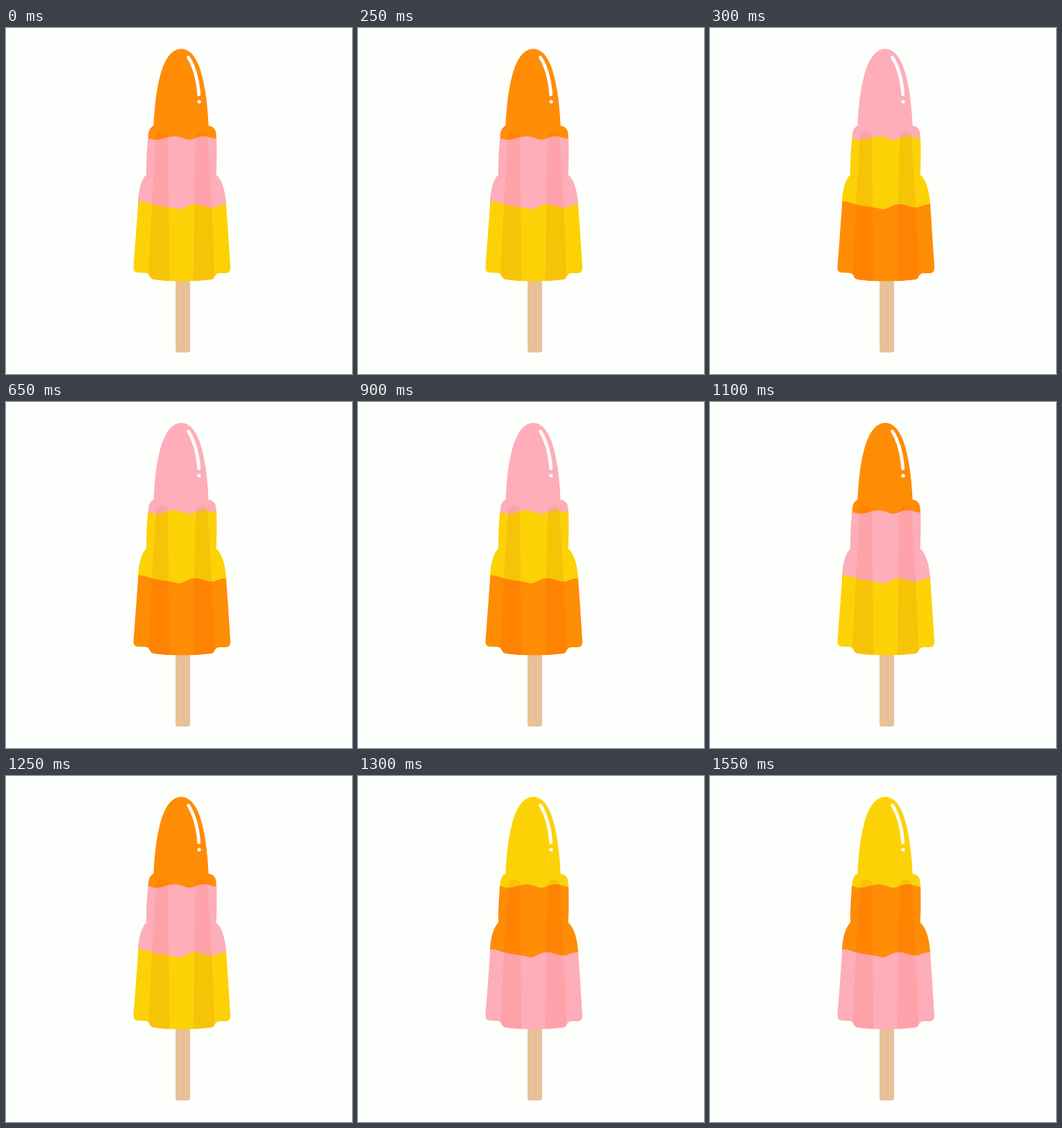
An HTML page for the animation above (1600 ms loop, 498 by 498 pixels).

```html
<!DOCTYPE html>
<html lang="en">
<head>
<meta charset="utf-8">
<title>Ice lolly</title>
<style>
  html, body { margin: 0; width: 100%; height: 100%; overflow: hidden; background: #fdfffc; }
  svg { display: block; width: 100vw; height: 100vh; }
  .tier { fill: var(--ice); }
  .flute { fill: var(--shade); }
</style>
</head>
<body>
<svg viewBox="0 0 498 498">
  <defs>
    <path id="top" d="M252 30C267 30 277 47 282.500 70C288 93 290.500 116 291.500 140.500
      C299 142 302 146 302.500 153L303 165H204.300L204.700 156C205 148 207.500 143 212.500 140.500
      C213.500 116 216 91 221.500 70C227.500 46 238 30 252 30Z"/>
    <path id="mid" d="M204.300 158C212 161.500 220 162 228 159C238 155 247 155 256 159
      C262 161.500 267 161 273 158.500C281 155 288 155 295 158L303 159.500
      C303.500 175 303.500 195 302.500 211C311 218 315.500 234 317 253V262H190V250
      C191 234 194 219 202 211C201.500 192 203 175 204.300 158Z"/>
    <path id="low" d="M190.500 249.500C200 249.500 205 252 210 254C222 257 238 258 248 261
      C256 261 262 254 271 253.500C281 254 287 258.500 296 258.500C304 258 309 252.500 317 254
      L323 344Q323.500 353 316 353L306 353Q302 354 300 358Q299 361 295 362Q274 364.500 252 364.500
      Q230 364.500 213 362Q208 361 207 357Q205 352.500 200 352.500L190 352Q183 352 183.500 344Z"/>
    <path id="flutes" d="M216 156Q217 149 224.500 149T233 156L235.500 370H204.500L210 254Z
      M273 156Q274 149 281.500 149T290 156L296 254L301 370H269.500L271 254Z"/>
    <clipPath id="topClip"><use href="#top"/></clipPath>
    <clipPath id="midClip"><use href="#mid"/></clipPath>
    <clipPath id="lowClip"><use href="#low"/></clipPath>
  </defs>

  <path d="M244 360H265V464Q265 467 262 467H247Q244 467 244 464Z" fill="#e8c197"/>

  <g class="tier">
    <use href="#top"/>
    <use href="#flutes" class="flute" clip-path="url(#topClip)"/>
  </g>
  <g class="tier">
    <use href="#mid"/>
    <use href="#flutes" class="flute" clip-path="url(#midClip)"/>
  </g>
  <g class="tier">
    <use href="#low"/>
    <use href="#flutes" class="flute" clip-path="url(#lowClip)"/>
  </g>

  <path d="M262.500 42.300Q275 62 277.700 95.700" fill="none" stroke="#fff" stroke-width="4.800" stroke-linecap="round"/>
  <circle cx="278" cy="106" r="2.600" fill="#fff"/>
</svg>

<script>
  const flavours = [
    { ice: '#ff8c05', shade: '#ff8303' },
    { ice: '#fdaeb8', shade: '#fea2aa' },
    { ice: '#fcd206', shade: '#f6c307' }
  ];
  const tiers = document.querySelectorAll('.tier');
  const TICK = 50, TICKS = 32;
  const SHIFTS = 39, PHASE = 0.375;

  // Flavours climb 39 times per loop, seen only on the 50 ms ticks.
  function draw() {
    const tick = Math.floor(performance.now() / TICK) % TICKS;
    const shift = Math.floor(tick * SHIFTS / TICKS + PHASE);
    tiers.forEach((tier, i) => {
      const { ice, shade } = flavours[(i + shift) % flavours.length];
      tier.style.setProperty('--ice', ice);
      tier.style.setProperty('--shade', shade);
    });
    requestAnimationFrame(draw);
  }
  draw();
</script>
</body>
</html>
```
